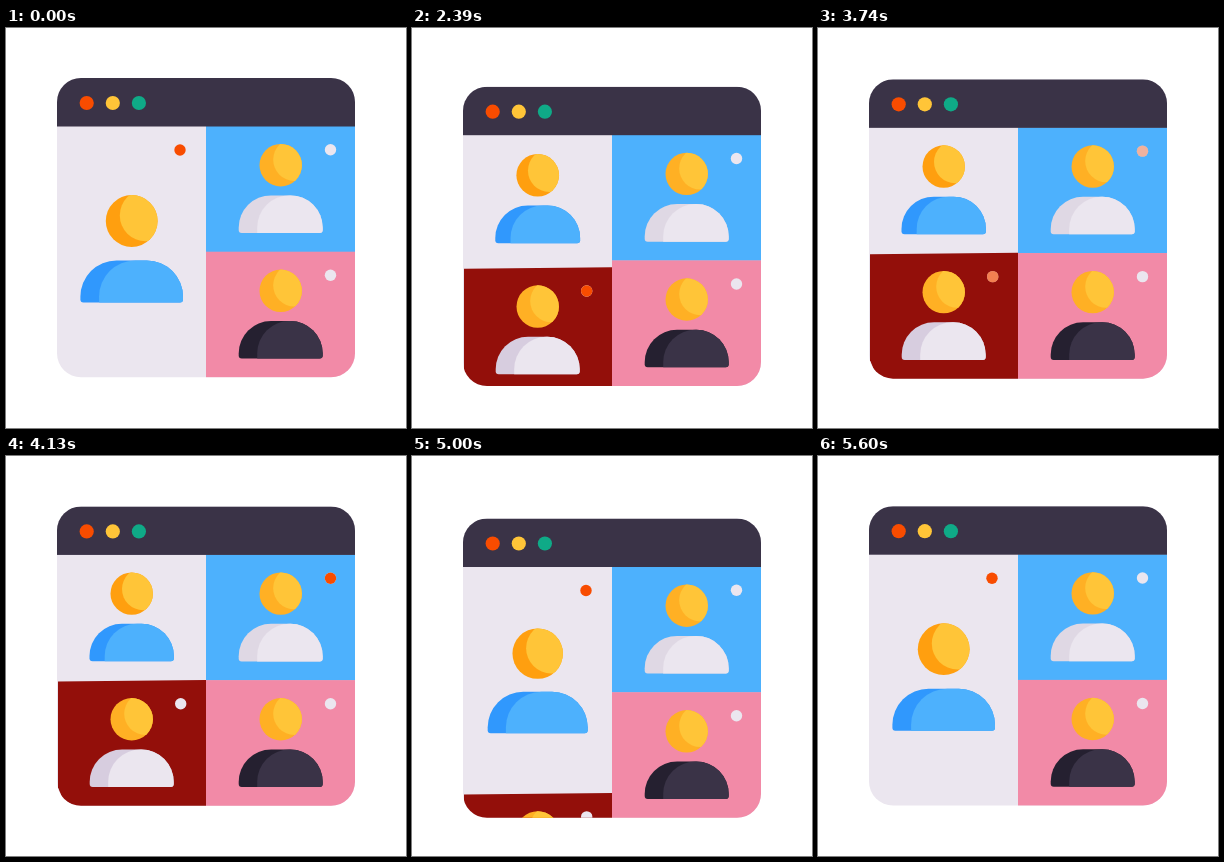
An HTML page with a canvas that plays this animation: 400 by 400 pixels, repeating every 5.63 s.

```html
<!DOCTYPE html>
<html lang="en">
<head>
<meta charset="utf-8">
<title>Video call</title>
<style>
html, body { margin: 0; width: 100%; height: 100%; overflow: hidden; background: #fff; }
canvas { display: block; }
</style>
</head>
<body>
<canvas id="stage" width="400" height="400"></canvas>
<script>
const ctx = document.getElementById('stage').getContext('2d');
const LOOP = 5630, REST_END = 2020;
const SPLIT = 1990, SWAP = 3690, MERGE = 4685;
const RED = '#f84c00', PALE = '#ebe6ef', DARK = '#3a3347', BLUE = '#4db1fd', GOLD = '#ffc538';

const clamp = x => Math.min(1, Math.max(0, x));
const mix = (a, b, k) => a + (b - a) * k;
const ease = x => Math.sin(Math.PI / 2 * clamp(x) ** 0.75) ** 2;
const fade = (t, from) => clamp((t - from) / 150);

// Quick rise to the peak, then a long settling tail
function pulse(t, peak, height) {
  const x = Math.max(0, t) / peak;
  return height * (x * Math.exp(1 - x)) ** 2.6;
}

function rect(x, y, w, h, color) {
  ctx.fillStyle = color;
  ctx.fillRect(x, y, w, h);
}

function dot(x, y, r, color, alpha = 1) {
  ctx.globalAlpha = alpha;
  ctx.fillStyle = color;
  ctx.beginPath();
  ctx.arc(x, y, r, 0, 7);
  ctx.fill();
  ctx.globalAlpha = 1;
}

function clipped(path, draw) {
  ctx.save();
  ctx.beginPath();
  path();
  ctx.clip();
  draw();
  ctx.restore();
}

function shoulders(x, y, w, h, foot, color) {
  const r = h * 0.86;
  ctx.fillStyle = color;
  ctx.beginPath();
  ctx.roundRect(x, y, w, h, [r, r, 3, foot]);
  ctx.fill();
}

function person(p) {
  dot(p.x, p.y, p.r, p.skin);
  clipped(() => ctx.arc(p.x, p.y, p.r, 0, 7),
    () => dot(p.x + p.shade, p.y - p.shade * 0.4, p.r, GOLD));
  const left = p.x - p.w / 2;
  shoulders(left, p.top, p.w, p.h, 3, p.dark);
  shoulders(left + p.fold, p.top, p.w - p.fold, p.h, 0, p.light);
}

function smallPerson(x, y, dark, light) {
  person({ x, y, r: 21.2, shade: 13.7, skin: '#ffb024',
    top: y + 30.2, w: 84, h: 37.6, fold: 18.5, dark, light });
}

function mainPerson(k) {
  person({ x: 125.7, y: mix(193, 137.2, k), r: mix(25.9, 21.2, k), shade: mix(14, 11.5, k),
    skin: '#ff9f0f', top: mix(232.5, 167.3, k), w: mix(102.6, 84.4, k),
    h: mix(42, 37.6, k), fold: mix(18.7, 15.2, k), dark: '#3098fd', light: BLUE });
}

function guest(shift, redAlpha) {
  ctx.save();
  ctx.translate(0, shift);
  ctx.fillStyle = '#930f0a';
  ctx.beginPath();
  [[52, 225], [200, 223.5], [200, 350], [69, 350], [57, 343], [52, 331]]
    .forEach(([x, y]) => ctx.lineTo(x, y));
  ctx.fill();
  smallPerson(125.7, 262.8, '#d7cddf', PALE);
  dot(174.7, 247.3, 5.7, PALE);
  dot(174.7, 247.3, 5.7, RED, redAlpha);
  ctx.restore();
}

function render(t) {
  const moving = t >= REST_END;
  const progress = span => !moving ? 0
    : t < MERGE ? ease((t - SPLIT) / span) : 1 - ease((t - MERGE) / span);
  const bob = moving ? pulse(t - SPLIT, 225, 14.8) + pulse(t - SWAP, 150, 4)
    + pulse(t - MERGE, 225, 14.8) : 0;
  const panel = progress(500);
  const swapped = fade(t, SWAP);

  rect(0, 0, 400, 400, '#fff');
  ctx.save();
  ctx.translate(0, bob);
  clipped(() => ctx.roundRect(51, 50, 298, 299.3, 24), () => {
    rect(51, 50, 298, 300, PALE);
    rect(200, 98, 150, 126, BLUE);
    rect(200, 223.7, 150, 126, '#f28aa7');
    rect(51, 50, 298, 48.5, DARK);
    [RED, GOLD, '#0faa87'].forEach((color, i) => dot(80.7 + i * 26.1, 75, 7.1, color));

    dot(174, 122, 5.7, RED, 1 - fade(t, 2080) + fade(t, MERGE + 60));
    mainPerson(progress(460));
    if (panel > 0) guest((1 - panel) * 125.5, 1 - swapped);

    smallPerson(274.7, 137.2, '#dfd8e4', PALE);
    smallPerson(274.7, 262.8, '#252030', DARK);
    dot(324.5, 121.8, 5.7, PALE);
    dot(324.5, 121.8, 5.7, RED, swapped - fade(t, MERGE + 60));
    dot(324.5, 247.3, 5.7, PALE);
  });
  ctx.restore();
}

function tick() {
  render(performance.now() % LOOP);
  requestAnimationFrame(tick);
}
tick();
</script>
</body>
</html>
```
